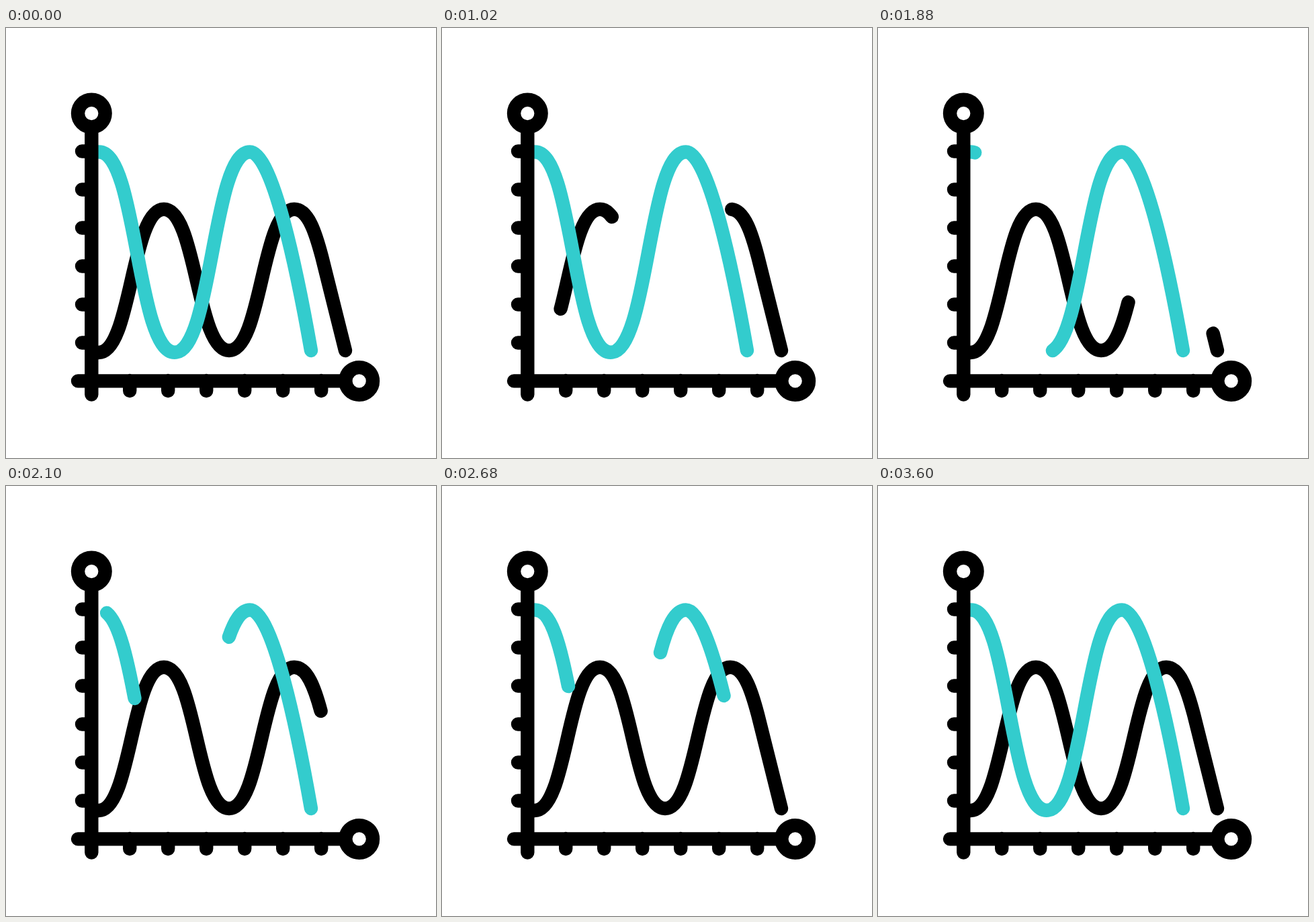
Write an HTML page that moves like this. It is 640 px wide and 640 px high and loops after 3620 ms.

```html
<!DOCTYPE html>
<html lang="en">
<head>
<meta charset="utf-8">
<title>Wave chart</title>
<style>
  html, body { margin: 0; width: 100%; height: 100%; overflow: hidden; background: #fff; }
  svg { display: block; width: 100%; height: 100%; }
</style>
</head>
<body>
<svg viewBox="0 0 640 640" fill="none" stroke="#000" stroke-width="20.4" stroke-linecap="round">
  <g id="waves"></g>
  <path id="axes" d="M127.3 150V545.6M107 525.4H500"/>
  <circle cx="127.3" cy="127.1" r="20.3" fill="#fff"/>
  <circle cx="525.7" cy="525.4" r="20.3" fill="#fff"/>
</svg>
<script>
const LOOP = 3620, SWEEP = 1200;
const NS = 'http://www.w3.org/2000/svg';

const waves = [
  {
    color: '#000', start: 200,
    d: 'M131.5 483H138C186.5 483 186.5 269.8 235 269.8S283.5 480 332 480S380.5 269.8 429 269.8' +
       'C450 269.8 461 306 470 340L505 480'
  },
  {
    color: '#33cccd', start: 1400,
    d: 'M131.5 184.5H138.7C194.8 184.5 194.8 482.8 251 482.8S307 184.5 363 184.5' +
       'C397 184.5 434 366 454 480'
  }
];

function addPath(parent, attrs) {
  const el = document.createElementNS(NS, 'path');
  for (const key in attrs) el.setAttribute(key, attrs[key]);
  return parent.appendChild(el);
}

// Axis ticks
const axes = document.getElementById('axes');
let ticks = '';
for (let i = 0; i < 6; i++) {
  ticks += `M113 ${183.5 + 57 * i}H127M${184.2 + 57 * i} 525V540`;
}
axes.setAttribute('d', axes.getAttribute('d') + ticks);

// Each wave is three trimmed strokes: leaving, passing, arriving
const group = document.getElementById('waves');
for (const wave of waves) {
  wave.parts = [0, 1, 2].map(() => addPath(group, { d: wave.d, stroke: wave.color }));
  wave.length = wave.parts[0].getTotalLength();
}

function sweep(t, start) {
  const x = Math.min(1, Math.max(0, (t - start) / SWEEP));
  return x * x * (3 - 2 * x);
}

function trim(el, length, from, to) {
  const visible = to - from > 1e-6;
  el.setAttribute('visibility', visible ? 'visible' : 'hidden');
  if (!visible) return;
  el.setAttribute('stroke-dasharray', `${(to - from) * length + 0.01} ${length * 2}`);
  el.setAttribute('stroke-dashoffset', -from * length);
}

function draw(t) {
  for (const { parts, length, start } of waves) {
    const edge = delay => sweep(t, start + delay);
    trim(parts[0], length, edge(0), 1);
    trim(parts[1], length, edge(600), edge(400));
    trim(parts[2], length, 0, edge(1000));
  }
}

const origin = performance.now();
function tick() {
  draw((performance.now() - origin) % LOOP);
  requestAnimationFrame(tick);
}
tick();
</script>
</body>
</html>
```
